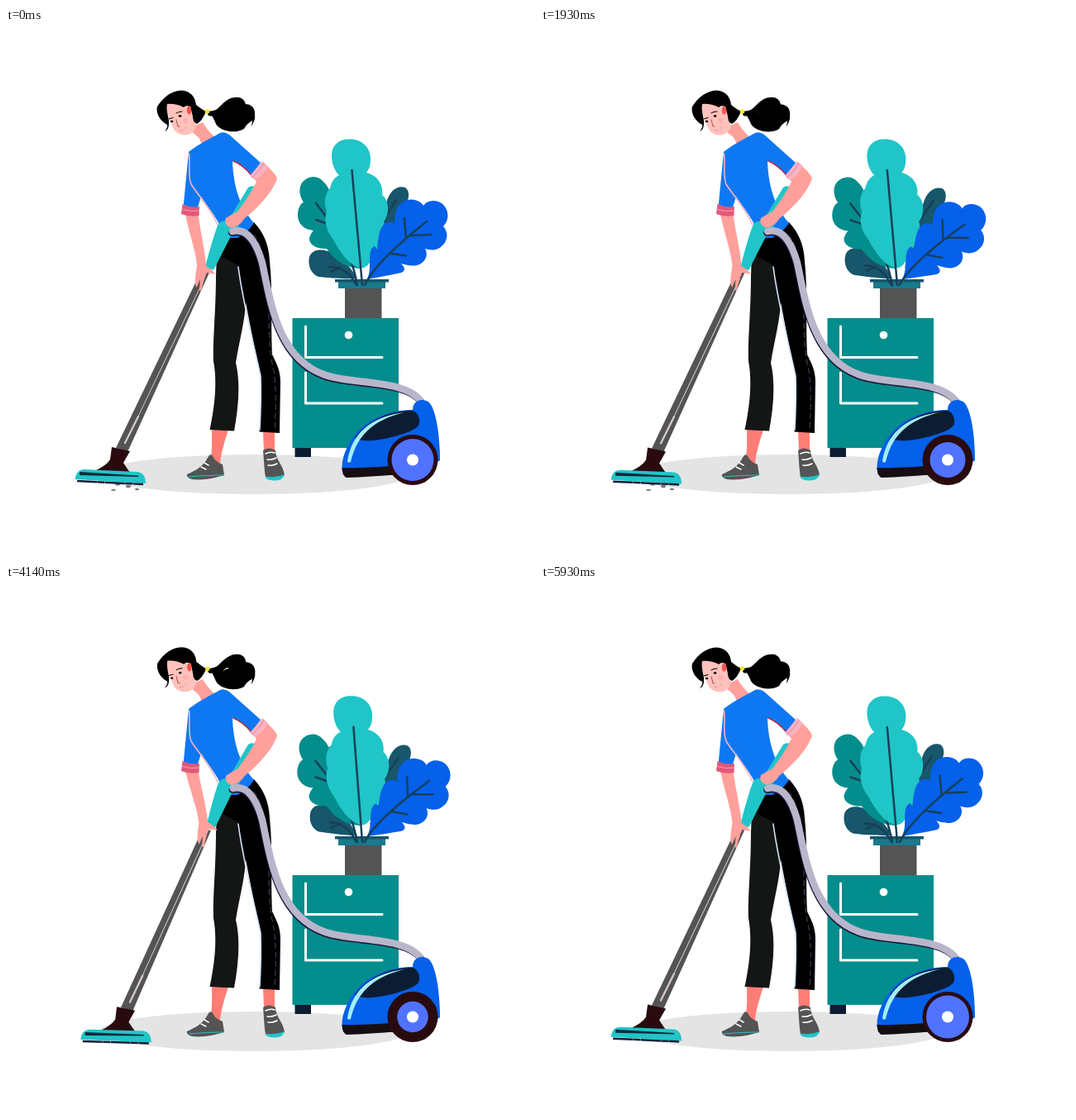
Recreate the animation shown at these times as an HTML page. Size 640 by 640 pixels, loop 6 s.

```html
<!DOCTYPE html>
<html lang="en">
<head>
<meta charset="utf-8">
<title>Vacuuming</title>
<style>
html, body { margin: 0; width: 100%; height: 100%; overflow: hidden; background: #fff; }
svg { display: block; width: 100vw; height: 100vh; }
.line { fill: none; stroke-linecap: round; stroke-linejoin: round; }
.vein { stroke: #173f59; stroke-width: 2.5; }
.white { stroke: #fff; }
.teal { fill: #20c5c8; }
.deep { fill: #048d8d; }
.slate { fill: #17566b; }
.blue { fill: #0560ea; }
.shirt { fill: #0e78f3; }
.skin { fill: #ffa09b; }
.leg { fill: #ff7d75; }
.gray { fill: #545454; }
.maroon { fill: #290b0f; }
.navy { fill: #0c1d33; }
</style>
</head>
<body>
<svg viewBox="0 0 640 640">
  <ellipse cx="300" cy="540" rx="187.500" ry="24" fill="#e4e4e4"/>

  <!-- cabinet -->
  <path class="navy" d="M349.500 506H369V519H349.500Z"/>
  <path class="deep" d="M346.500 351H475V508H346.500Z"/>
  <path class="line white" stroke-width="3" d="M362.500 361V398.500H455M362.500 417V454H455"/>
  <circle cx="414.500" cy="371.500" r="4.800" fill="#fff"/>

  <!-- plant -->
  <path class="gray" d="M410 313H454.500V351H410Z"/>
  <path fill="#187a8c" d="M402 307H459V315H402Z"/>
  <path class="slate" d="M398 304H463V307.500H398Z"/>
  <g id="leafBack">
    <path class="slate" d="M440 290C450 260 452 240 460 212C464 196 474 190 483 193C489 197 488 207 483 215C489 222 486 234 480 240L455 275Z"/>
    <path class="line vein" d="M472 208L458 230"/>
  </g>
  <g id="leafLow">
    <path class="slate" d="M425 303C412 304 388 302 378 301C368 297 365 286 367 277C370 268 380 267 390 270C404 276 416 288 423 300Z"/>
    <path class="line vein" d="M391 289Q412 288 424 311M393 295L404 290"/>
  </g>
  <g id="leafLeft">
    <path class="deep" d="M428 291C412 290 398 282 388 267C376 268 366 262 367 254C369 248 371 246 372 245C360 244 352 236 353 224C354 216 357 212 360 211C354 202 354 192 359 186C366 178 378 178 384 186C388 190 390 193 391 196C400 190 410 200 408 212L440 280Z"/>
    <path class="line vein" d="M375 212L388 229Q416 262 425 311M375 232L392 238"/>
  </g>
  <g id="leafTop">
    <path class="teal" d="M430 290C418 290 404 272 396 256C388 246 384 234 388 222C384 212 386 200 392 194C394 186 396 182 403 178C398 174 394 164 394 154C394 142 403 134 415 134.500C430 134 441 144 441 158C441 166 440 170 436 175C448 178 457 188 455 202C464 208 464 226 457 234C462 250 450 266 444 276C440 286 435 291 430 290Z"/>
    <path class="line vein" d="M418.500 172L431 311"/>
  </g>
  <g id="leafRight">
    <path class="blue" d="M437 304C440 296 440 292 440 284C440 272 441 266 446 264Q449 266 449 270C450 250 453 236 463 235C469 234 471 237 471 240C468 224 474 208 490 207.500C498 208 503 211 505 215C509 208 520 207 527 212C536 219 537 232 529 240C536 247 534 258 528 263C522 270 513 269 507 267C512 276 506 286 495 287.500C487 288 482 286 478 285Q486 293 478 296Q460 300 437 304Z"/>
    <path class="line vein" d="M434 311Q447 283 509 234M484 254L482 230M489 251L514 250M466 273L484 275.500"/>
  </g>

  <!-- legs and shoes -->
  <path class="leg" d="M249 484L269 486C264 502 260 514 259 527L247 524C250 510 249 498 249 484ZM311 487H325V512H312Z"/>
  <path class="gray" d="M219 540C230 535 238 531 244 520C246 516 248 515 250 518Q254 526 262 528L264 541Q240 548 225 546Q218 544 219 540ZM311 511Q318 506 326 511C326 522 336 530 337 541Q330 547 314 544C312 530 312 520 311 511Z"/>
  <path class="teal" d="M314 542.500Q326 545 337 540Q335 548 324 547.500Q314 547 314 542.500Z"/>
  <path class="line" stroke="#20c5c8" d="M221 543Q245 541 263 541"/>
  <path class="line white" stroke-width="1.500" d="M236 531l6 3M240 526l5 3M314 515q6 -3 11 -1M316 522q6 1 11 -2M317 529q6 1 11 -2"/>
  <path fill="#141616" d="M255 272L254 300C254 340 250 380 251 403C256 430 252 460 246.500 486L276 487.500C281 460 284 430 278 405C282 380 290 350 290 330L283 275Z"/>
  <path d="M300 235C312 248 318 262 319 282C323 320 320 360 322 395C327 405 332 414 332 428L331 490L306.500 488.500C308 465 309 440 308 421C300 385 290 330 281 287L260 276L258 256Z"/>
  <path class="line" stroke="#d5e0fb" stroke-width="1.600" d="M281 289C287 335 298 375 308 421Q309 450 307 486"/>
  <path class="line" stroke="#484c68" stroke-dasharray="6 5" d="M300 250C317 275 317 320 318 350Q318 390 324 415Q328 440 325 488"/>

  <!-- torso -->
  <path class="skin" d="M227 119L238 114Q244 125 254 133L237 141Q234 131 226 127Z"/>
  <path class="shirt" d="M222 149C235 139 252 131 259 127Q264 125 270 129L308 163L297 179Q285 165 274 161C275 190 282 215 300 236Q292 248 280 254H262C262 236 246 220 236 204L232 217H214.500L221 150Z"/>
  <path class="line" stroke="#ffb5bd" stroke-width="1.500" d="M221.500 152C223 166 220 180 224 189C232 202 246 216 256 238"/>
  <path class="line" stroke="#b52e44" stroke-width="1.500" d="M275 161Q286 165 297 178"/>

  <!-- head -->
  <g id="head">
    <path id="tail" d="M245 101C254 105 260 98 271 90C281 86 285 89 289 92C298 92 302 98 301 106Q302 110 297 119L298 112Q291 116 288 122C276 129 258 124 254 116Q250 106 245 101Z"/>
    <path id="strand" class="line" stroke="#000" stroke-width="6" d="M247 103.500C260 104 262 91 274 87.500C284 85 288 89 287 98"/>
    <path id="gap" fill="#fff" d="M0 0C6 -8 11 -14 19 -14.500Q24 -14 22 -10Q10 -10 0 0Z"/>
    <path fill="#ffc1bc" d="M193 91C205 88 220 92 226 105L230 118Q228 128 218 129.500Q209 130 204 124Q196 110 193 91Z"/>
    <circle cx="217" cy="112" r="3" fill="#ffb0ae"/>
    <path d="M192 125Q196 120 195 117C185 112 181 101 183 95C190 84 200 76 212 75.500C224 76 229 84 230 93Q236 98 242 101Q237 113 231 116Q226 114 226 107L223 95Q217 93 215 96Q205 91 195 92C193 100 198 110 197 116Q197 123 192 125Z"/>
    <ellipse cx="221.500" cy="99.500" rx="2.700" ry="5" fill="#f2564e"/>
    <circle cx="243.500" cy="101" r="2.700" fill="#ffe81c"/>
    <path class="line" stroke="#000" d="M197 110L202 108.500M206 103Q209 101 213 101"/>
    <ellipse cx="200.500" cy="113" rx="1.800" ry="1.200"/>
    <ellipse cx="210.500" cy="106.500" rx="1.900" ry="1.300"/>
    <path class="line" stroke="#8a3434" stroke-width=".8" d="M206 111L208 119L210 119"/>
    <path fill="#fff" stroke="#e86464" stroke-width=".5" d="M210 124Q215 123 218 120Q217 125 210 124Z"/>
  </g>

  <!-- wand -->
  <g id="dust" fill="#777">
    <ellipse cx="130" cy="559" rx="3" ry="1.100"/>
    <ellipse cx="148" cy="554.500" rx="3" ry="1.800"/>
    <ellipse cx="158.500" cy="558" rx="2.500" ry="1.200"/>
    <ellipse cx="135" cy="552" rx="3" ry="1.500"/>
  </g>
  <g id="wand">
    <path class="gray" d="M236 294L246 296L147 513L133 508Z"/>
    <path class="line" stroke="#d5caca" d="M240 303L155 480"/>
    <path class="line" stroke="#d5caca" stroke-width="2.300" d="M160 470L144 502"/>
    <path class="maroon" d="M128 507L150 512L142 526Q147 534 151 539L107 536Q122 529 126 522Z"/>
    <path class="teal" d="M83.500 546Q85 534 95 534L160 537Q169 539 169 551Z"/>
    <path fill="#0b2c3c" d="M89 537L160 541.500V543L89 541Z"/>
    <path fill="none" stroke="#10203a" stroke-width="2.500" stroke-dasharray="24 .4 9 .4" d="M86 548L166 552"/>
    <path class="teal" d="M293 193Q297 190 302 192.500L281 240L272 252L251 293L241 289C246 270 251 252 256 239Q260 232 268 234Z"/>
  </g>
  <path id="armLeft" class="skin" d="M216 220L232 220C235 248 241 268 242 288Q248 291 253.500 298L243 296L240 303L236 318L234 317L235 304L230.500 314L228.500 309Q229 298 231 288C230 270 221 248 216 220Z"/>
  <path fill="#e2587a" d="M213.500 213Q224 218 234 216L233.500 227Q222 229 212 225Z"/>
  <path class="line" stroke="#f7a0b0" d="M213 219.500Q224 223 233.500 221"/>

  <!-- vacuum -->
  <path id="hoseShade" class="line" stroke="#1d1838" stroke-width="8.500"/>
  <path id="hose" class="line" stroke="#b9b6cb" stroke-width="8.500"/>
  <path class="blue" d="M406.500 533C406 518 414 502 424 490C438 472 466 462 492 462C492 450 504 447 512 453C520 462 525 490 525 523L500 541H408Z"/>
  <path fill="#160f12" d="M406.500 532Q440 533 475 529V540Q440 543 412 544Q407 542 406.500 532Z"/>
  <path class="navy" d="M422 496C436 476 464 462 492 463C499 465 502 475 499 481C494 488 470 495 452 498C440 500 428 500 422 496Z"/>
  <path fill="#a4eef6" d="M413 524C418 492 440 470 482 465C444 474 424 494 417 525Q414 527 413 524Z"/>
  <circle class="maroon" cx="492" cy="522.500" r="30.500"/>
  <circle id="wheel" cx="492" cy="522.500" fill="#5073ff"/>
  <circle cx="492" cy="522.500" r="7" fill="#fff"/>

  <!-- near arm -->
  <path id="armRight" class="skin" d="M300 182L316 167C322 173 327 178 328 182C322 200 304 218 288 231C284 238 276 242 272 241.500C266 240 264 234 266 230Q274 225 280 222Q294 204 303 186Z"/>
  <path fill="#f7b3c3" d="M295 179L310 161L317 167Q312 177 301 184Z"/>
  <path class="line" stroke="#e2839a" d="M298 181Q306 173 312 164"/>
</svg>
<script>
const LOOP = 6000, FRAMES = 84, STEP = LOOP / FRAMES;
const $ = id => document.getElementById(id);
const turn = (id, angle, x, y) => $(id).setAttribute('transform', `rotate(${angle} ${x} ${y})`);

// Linear back-and-forth from 0 to 1 and back over one period.
const swing = (t, period) => {
  const phase = (t / period % 1 + 1) % 1;
  return 1 - Math.abs(1 - 2 * phase);
};

const radii = [[0, 25.5], [1210, 16.5], [1930, 21.5], [2570, 17], [3500, 21], [4790, 16.5], [5930, 26], [6000, 25.5]];
const wheelRadius = t => {
  const i = radii.findIndex(k => k[0] > t);
  const [t0, r0] = radii[i - 1], [t1, r1] = radii[i];
  return r0 + (r1 - r0) * (t - t0) / (t1 - t0);
};

function draw(t) {
  const sweep = t > 0 ? swing(t + 40, 2000) : 0;
  const lag = t > 0 ? swing(t - 40, 2000) : 0;
  const slow = swing(t, 3000);

  turn('wand', -6 * sweep, 295, 195);
  turn('armLeft', -11 * sweep, 223, 222);
  turn('armRight', -2.8 * sweep, 322, 178);
  turn('head', 4 * sweep, 232, 125);
  turn('tail', 4 * sweep, 247, 103);
  turn('strand', -6 * sweep, 247, 103);
  $('gap').setAttribute('transform', `translate(262 104) scale(${Math.min(1, 1.7 * sweep)})`);

  turn('leafTop', 4.3 * sweep, 432, 312);
  turn('leafLeft', -4 * lag, 430, 312);
  turn('leafRight', 5 * swing(t, 1500), 437, 305);
  turn('leafLow', 4 * slow, 425, 305);
  turn('leafBack', 2.4 * slow, 440, 290);

  const hose = (dx, dy) => `M${274 + 4 * sweep + dx} ${246 + dy}C${290 + 3 * sweep + dx} ${242 + dy} ${302 + dx} ${256 + dy} ${310 + dx} ${284 + dy}C${320 + dx} ${330 + dy} ${328 + dx} ${398 + dy} ${384 + dx} ${419 + dy}C${416 + dx} ${432 + dy} ${484 + dx} ${424 + dy} 502 452`;
  $('hose').setAttribute('d', hose(0, 0));
  $('hoseShade').setAttribute('d', hose(-.7, 1.6));
  $('wheel').setAttribute('r', wheelRadius(t));
  $('dust').style.display = t < 3000 ? '' : 'none';
}

// Steps begin on times rounded to 10 ms, so allow half of that.
const start = performance.now();
function tick() {
  const t = performance.now() - start + 5;
  draw(Math.floor(t / STEP) % FRAMES * STEP);
  requestAnimationFrame(tick);
}
tick();
</script>
</body>
</html>
```
